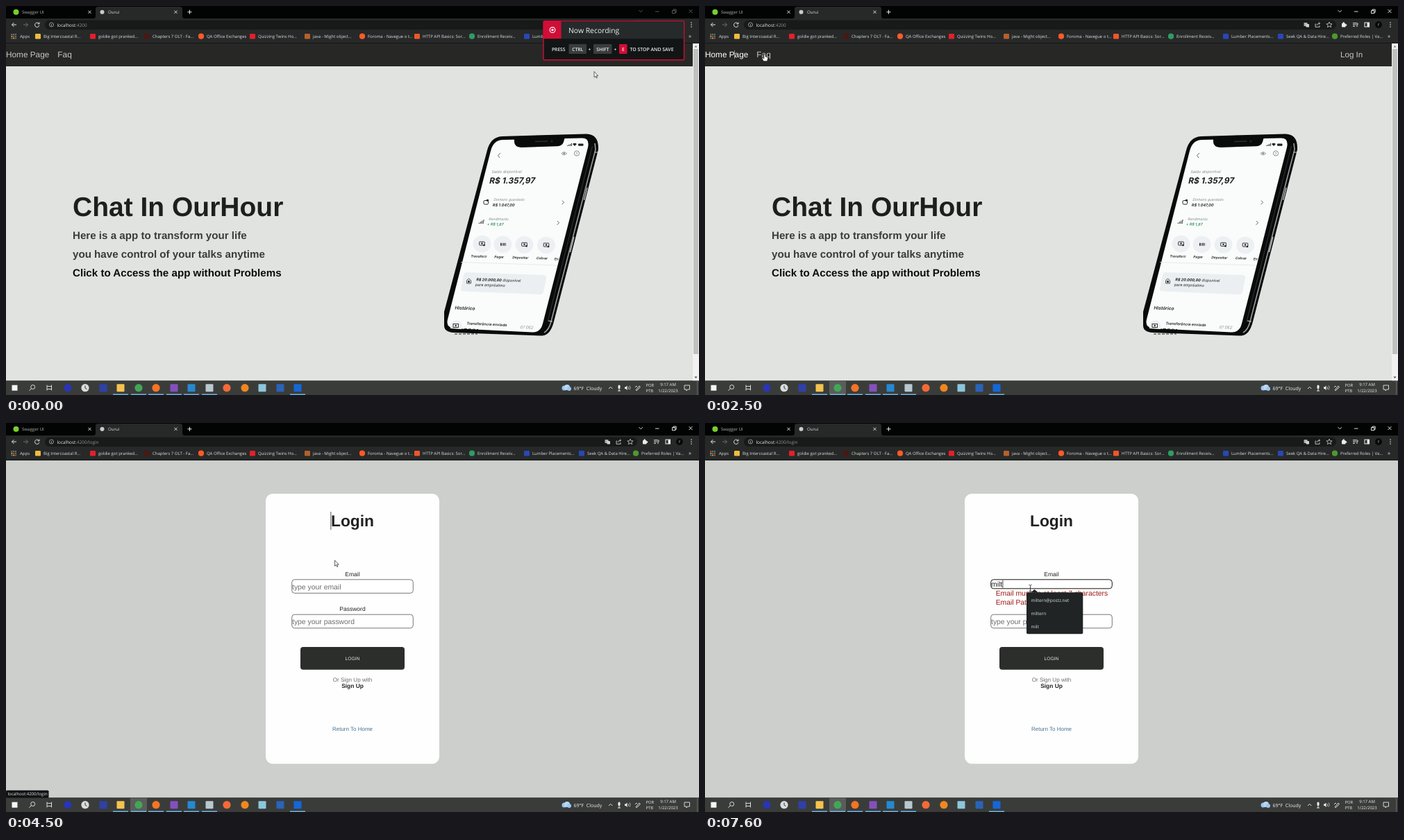
Recreate the animation shown at these times as an HTML page. Size 998 px wide and 561 px high, loop 8000 ms.

```html
<!DOCTYPE html>
<html lang="en">
<head>
<meta charset="utf-8">
<title>Login walkthrough</title>
<style>
html, body { margin: 0; height: 100%; overflow: hidden; background: #000; }
svg { display: block; width: 100%; height: 100%; }
text { text-rendering: geometricPrecision; white-space: pre; }
.ui { font-family: "Open Sans", "Noto Sans", sans-serif; }
.page { font-family: "Liberation Sans", Arial, sans-serif; }
.app { font-family: Inter, Roboto, sans-serif; }
.line { fill: none; stroke: #e4e6e6; stroke-width: 1; }
</style>
</head>
<body>
<svg id="stage" viewBox="0 0 998 561" xmlns="http://www.w3.org/2000/svg"></svg>
<script>
const rect = (x, y, w, h, fill, more = '') =>
  `<rect x="${x}" y="${y}" width="${w}" height="${h}" fill="${fill}" ${more}/>`;
const dot = (x, y, r, fill, more = '') => `<circle cx="${x}" cy="${y}" r="${r}" fill="${fill}" ${more}/>`;
const path = (d, fill, more = '') => `<path d="${d}" fill="${fill}" ${more}/>`;
const line = (d, more = '') => `<path d="${d}" class="line" ${more}/>`;
const text = (x, y, size, str, fill, more = '') =>
  `<text x="${x}" y="${y}" font-size="${size}" fill="${fill}" ${more}>${str}</text>`;
const group = (id, body, more = '') => `<g id="${id}" ${more}>${body}</g>`;
const bold = 'font-weight="700"', semi = 'font-weight="600"', mid = 'text-anchor="middle"';

// Browser frame
function browser() {
  const marks = [
    [42, '#f0bd3c', 0, 'Big Intercoastal R...'],
    [121, '#e3202b', 0, 'goldie got pranked...'],
    [199, '#4a1712', 0, 'Chapters 7 OLT - Fa...'],
    [277, '#ff5a26', 1, 'QA Office Exchanges'],
    [351, '#e3202b', 0, 'Quizzing Twins Ho...'],
    [430, '#b5602c', 0, 'java - Might object...'],
    [509, '#ff5a26', 1, 'Foroma - Navegue o t...'],
    [588, '#f0562b', 0, 'HTTP API Basics: Sor...'],
    [667, '#2f9c63', 1, 'Enrollment Receiv...'],
    [746, '#2748b8', 0, 'Lumber Placements...'],
    [825, '#2748b8', 0, 'Seek QA &amp; Data Hire...'],
    [903, '#4d9a2a', 1, 'Preferred Roles | Va...']
  ];
  let s = rect(0, 0, 998, 54, '#020303')
    + path('M126 18Q129 18 129 14V4Q129 1 133 1H250Q254 1 254 4V14Q254 18 257 18Z', '#272929')
    + rect(0, 18, 998, 35.5, '#272929')
    + rect(56, 20.5, 853, 13.5, '#181a1a', 'rx="6.7"')
    + dot(14.5, 8.7, 4, '#77d02b') + text(23, 11, 6.1, 'Swagger UI', '#aeb2b3')
    + dot(138.5, 8.7, 3, '#c8cccd') + text(147, 11, 6.1, 'Ourui', '#dfe2e2')
    + line('M118.5 6.7l4 4m0-4l-4 4M242.5 6.7l4 4m0-4l-4 4M261.5 8.7h6m-3-3v6')
    + line('M15 27H8.5m3-3l-3 3l3 3')
    + line('M25 27h6.5m-3-3l3 3l-3 3', 'style="stroke:#6b6f70"')
    + line('M47.3 25.3A3.2 3.2 0 1 0 47.9 28M48 23.5v2.4h-2.4')
    + dot(65.5, 27, 3, 'none', 'stroke="#b3b7b8" stroke-width=".8"') + rect(65.1, 26.2, .9, 2.5, '#b3b7b8')
    + text(73.5, 29.5, 6.4, 'localhost<tspan fill="#8f9495">:4200</tspan><tspan id="route" fill="#8f9495">/login</tspan>', '#e9ebeb')
    + rect(862.5, 24, 5, 5, '#aeb2b3', 'rx=".6"') + rect(865.5, 26, 4.5, 4.5, '#d0d3d3', 'rx=".6"')
    + line('M880 26h-1v4.3h6V28M881 28q.5-3 4.5-3m-1.7-1.6l1.8 1.6l-1.8 1.6', 'style="stroke-width:.8"')
    + path('M899 23l1.1 2.7 3 .2-2.3 1.9.8 2.9-2.6-1.6-2.6 1.6.8-2.9-2.3-1.9 3-.2z', 'none', 'stroke="#cfd2d2" stroke-width=".8"')
    + rect(917, 25, 5.5, 5.5, '#eceeee', 'rx=".8"') + dot(919.7, 24.6, 1.3, '#eceeee') + dot(923, 27.5, 1.3, '#eceeee')
    + line('M933 24.7h6.5M933 27h4.5M933 29.3h3M939 26v4m0-4h2')
    + rect(950, 24, 6.5, 6, 'none', 'stroke="#eee"') + rect(953.5, 24, 3, 6, '#eee')
    + dot(970, 27, 5, '#080909') + text(970, 29, 5.5, 'f', '#b9bcbc', mid)
    + [24, 27, 30].map(y => dot(987, y, .8, '#e6e8e8')).join('');
  for (let i = 0; i < 9; i++)
    s += rect(7.5 + i % 3 * 2.8, 40 + (i / 3 | 0) * 2.8, 1.8, 1.8, ['#e5533d', '#48a860', '#4a86e8', '#f0bd3c'][i % 4]);
  s += text(20, 46, 6, 'Apps', '#dfe2e2');
  for (const [x, color, round, name] of marks)
    s += (round ? dot(x + 4, 43.7, 4.1, color) : rect(x, 40, 8, 7.5, color, 'rx="1.2"'))
      + text(x + 12, 46, 6, name, '#dfe2e2');
  s += text(983, 46, 8, '»', '#dfe2e2');
  return s + group('buttons',
    path('M911.5 6l2.7 2.7l2.7-2.7M935 8h5.5M959.5 6.5h4.2v4.2h-4.2zM961 6.5V5h4.2v4.2h-1.5M983.5 5l5 5m0-5l-5 5', 'none'),
    'stroke-width=".9"');
}

// Text lying on the tilted phone screen
const tilt = (x, y, size, str, fill = '#1b1d1e', more = '') =>
  `<g transform="translate(${x} ${y}) rotate(${((y - 270) / 80).toFixed(2)}) skewX(-12)">${text(0, 0, size, str, fill, more)}</g>`;

function phone() {
  const gray = '#85898c';
  let s = path('M714 188L836 184.5Q854 185 853 207L789 455Q784 475 772 475.5L645 471Q631 470 631 461V441L693 208Q698 189 714 188Z', '#090a0a')
    + line('M848 198L849 207L785 455Q782 467 775 471', 'style="stroke:#999d9f;stroke-width:1.6"')
    + line('M844.5 202L780 455', 'style="stroke:#2b2e30;stroke-width:1.2"')
    + line('M837 262l-4.5 18M818 333l-5.500 22M848 211h4M781 454l6 1', 'style="stroke:#cdd0d0;stroke-width:1.2"')
    + path('M716 193L829 190.5Q841 190 838 204L773 458Q770 471 758 470.5L646 465Q633 464 636 452L698 209Q702 193 716 193Z', '#fafcfb')
    + path('M732 191L805 189L803 196Q801 202 794 202.3L742 204Q732 203 732 196Z', '#090a0a')
    + line('M762 195.5l18-.5', 'style="stroke:#2c2f31;stroke-width:1.5"') + dot(786, 195, 1.6, '#242a33')
    + path('M808 202v-1h1v1zm2 0v-2h1v2zm2 0v-3h1v3zm2 0v-4h1v4z', '#222')
    + path('M816 199q3-2.5 6 0l-3 3z', '#222') + rect(824, 198.5, 7.5, 3.3, '#222', 'rx="1"')
    + line('M712 212l-3.5 3.5l2.5 3.5M801 280.5l2.5 2.7l-3 3M794 310l2.5 2.7l-3 3', 'style="stroke:#55595b;stroke-width:.9"')
    + line('M764.5 399.5l2.5 2.7l-3 3', 'style="stroke:#222"')
    + line('M800 212.7q3.5-4 7.5 0q-4 4-7.5 0z', 'style="stroke:#6d7173;stroke-width:.8"') + dot(803.7, 212.6, 1.2, '#6d7173')
    + dot(822, 212.5, 3.6, 'none', 'stroke="#6d7173" stroke-width=".8"') + text(822, 214.7, 5.5, '?', '#6d7173', mid)
    + tilt(699, 241, 5.6, 'Saldo disponível', gray)
    + tilt(695.5, 256, 11.9, 'R$ 1.357,97', '#1b1d1e', bold)
    + rect(688, 280.5, 6.5, 5.5, 'none', 'stroke="#222" rx="1.5"') + rect(692, 279, 3, 2.5, '#222')
    + tilt(702, 281, 5.1, 'Dinheiro guardado', gray)
    + tilt(700.5, 289, 5.6, 'R$ 1.047,00', '#1b1d1e', semi)
    + path('M680.5 314l.3-1.5h1.2l-.3 1.5zm2 0l.5-3h1.2l-.5 3zm2 0l.7-4.5h1.2l-.7 4.5zm2 0l1-6h1.2l-1 6z', '#55595b')
    + tilt(695, 309, 5.1, 'Rendimento', gray)
    + tilt(692.5, 316.5, 5.4, '+ R$ 1,87', '#2f8c58', semi);
  [[685.5, 343, 669, 'Transferir'], [715.5, 343.7, 703, 'Pagar'], [746.5, 344.3, 729, 'Depositar'], [778, 345, 763.5, 'Cobrar']]
    .forEach(([x, y, tx, name], i) => {
      s += `<ellipse cx="${x}" cy="${y}" rx="13" ry="12.3" fill="#edf0f3"/>`
        + (i === 1
          ? path(`M${x - 3.5} ${y - 2}h1.5v4h-1.5zm2.5 0h.8v4h-.8zm2 0h1.5v4h-1.5zm2.5 0h.8v4h-.8z`, '#222')
          : rect(x - 3.8, y - 3, 7.6, 5, 'none', 'stroke="#222" stroke-width=".9" rx=".6"') + dot(x, y - .5, 1.2, '#222') + dot(x + 3, y + 2, 1.3, '#222'))
        + tilt(tx, 362.5 + i * .9, 4.9, name, '#1b1d1e', semi);
    });
  return s + tilt(789.5, 366.5, 4.9, 'En', '#1b1d1e', semi)
    + line('M655 369.5L794 374', 'style="stroke:#e1e4e6;stroke-width:.8"')
    + path('M664 384L774 388Q779 388.5 778 393L774 412Q773 416.5 768 416L659 411.5Q654 411 655 407L659 388Q660 384 664 384Z', '#ebeff2')
    + path('M663.5 400v-4q3-5 6 0v4z', 'none', 'stroke="#444" stroke-width=".9"') + rect(665, 396, 3, 3, '#444')
    + tilt(677, 396.3, 5.4, `<tspan ${bold}>R$ 20.000,00</tspan> disponível`)
    + tilt(675.5, 403.8, 5.4, 'para empréstimo')
    + tilt(646, 437.5, 6.7, 'Histórico', '#1b1d1e', semi)
    + path('M640 465Q639 454 649 453.5Q658 454 656 466Z', '#edf0f3')
    + rect(644, 458.5, 7.5, 5, 'none', 'stroke="#222" stroke-width=".9"') + dot(647.7, 461, 1.2, '#222')
    + tilt(663, 459.5, 5.4, 'Transferência enviada', '#1b1d1e', semi)
    + tilt(740, 465, 5.6, '07 DEZ', gray)
    + line('M660 465.5l20 1M646 473h33', 'style="stroke:#222;stroke-dasharray:4 2"');
}

function home() {
  return rect(0, 53.5, 998, 487, '#e1e3e0') + rect(0, 53.5, 989, 33.5, '#272826')
    + text(0, 74.3, 11.8, 'Home Page', '#c4c6c4', 'id="homeLink"')
    + text(74.3, 74.3, 11.9, 'Faq', '#c4c6c4')
    + text(915, 74.3, 11.6, 'Log In', '#c4c6c4', 'id="loginLink"')
    + rect(42, 64, .8, 12, '#aaa', 'id="navCaret"')
    + text(96, 303.3, 39, 'Chat In OurHour', '#1d1f1d', bold)
    + text(96, 335.5, 15.15, 'Here is a app to transform your life', '#3a3c3a', bold)
    + text(96, 363, 15.15, 'you have control of your talks anytime', '#3a3c3a', bold)
    + text(96, 390, 15.15, 'Click to Access the app without Problems', '#0c0d0c', bold)
    + `<g class="app">${phone()}</g>`
    + rect(989, 53.5, 9, 487, '#f0f1f0') + rect(990, 62, 7, 440, '#bfc1bf')
    + path('M991.5 59.5l2-2.5l2 2.5z', '#777') + path('M991.5 534.5l2 2.5l2-2.5z', '#444');
}

function login() {
  const red = '#a01818', ink = '#202220';
  return rect(0, 53.5, 998, 487, '#cccfcc') + rect(374, 102, 250, 389.5, '#fdfefd', 'rx="10"')
    + text(499, 148.5, 22.8, 'Login', ink, `${bold} ${mid}`)
    + rect(467.4, 128, .9, 26, '#444', 'id="titleCaret"')
    + text(499, 220.7, 8.5, 'Email', ink, mid)
    + rect(411.7, 225.8, 174.6, 19.6, '#fff', 'id="field" rx="4"')
    + text(412, 239.7, 10.4, 'type your email', '#6c6e6c', 'id="hint"')
    + text(412, 235.8, 10.4, '', ink, 'id="typed"')
    + rect(412.4, 228, .8, 14, '#111', 'id="caret"')
    + text(499, 271, 8.5, 'Password', ink, mid)
    + rect(411.7, 276.2, 174.6, 19.6, '#fff', 'rx="4" stroke="#767876"')
    + text(412, 290, 10.4, 'type your password', '#6c6e6c')
    + group('errors', text(418.7, 249, 10.35, 'Email must be at least 7 characters', red)
      + text(418.7, 261.5, 10.35, 'Email Pattern Invalid', red))
    + rect(424, 323, 150, 32.7, '#2c2e2c', 'rx="4"')
    + text(499, 342, 6.7, 'LOGIN', '#e3e5e3', mid)
    + text(499, 372.5, 8.1, 'Or Sign Up with', '#6c6e6c', mid)
    + text(499, 382.3, 8.4, 'Sign Up', ink, `${bold} ${mid}`)
    + text(499, 443.7, 8, 'Return To Home', '#4b7196', mid)
    + group('popup', rect(463, 244.3, 81.3, 60, '#202425', 'rx="2"') + path('M469 244.5l5.5-4.5l5.5 4.5z', '#202425')
      + ['miltern@postz.net', 'miltern', 'milt'].map((s, i) => text(469.5, 258 + i * 18.8, 6.4, s, '#dfe2e2')).join(''), 'class="ui"');
}

function taskbar() {
  const icons = [
    [89, '#2a35b5', 1], [114, '#d9dcdc', 1], [140, '#3040a8', 0], [165, '#f3c34e', 0], [191, '#43a556', 1],
    [216, '#f57425', 1], [242, '#8450bd', 0], [267, '#2589d0', 0], [293, '#b9c8d0', 0], [318, '#f56a37', 1],
    [344, '#f0871f', 1], [369, '#8cc6dc', 0], [395, '#2a63b8', 0], [420, '#1567d6', 0]
  ];
  let s = rect(0, 540.5, 998, 20.5, '#3a3c3a') + rect(179, 540.5, 24, 20.5, '#5a5c5a', 'id="active"')
    + rect(8.5, 546.7, 8, 8, '#f4f6f6')
    + dot(38.7, 549.5, 3, 'none', 'stroke="#eee" stroke-width=".9"') + line('M36.5 551.7l-3 3')
    + line('M59 546.5v8m6.5-8v8M59 548.5h6.5v4H59', 'style="stroke-width:.9"');
  for (const [x, color, round] of icons) {
    s += round ? dot(x, 550.7, 5.6, color) : rect(x - 5.5, 545.3, 11, 11, color, 'rx="1"');
    if ([165, 191, 216, 242, 267, 293, 420].includes(x)) s += rect(x - 11, 559.5, 22, 1.5, '#6fb3e4');
  }
  return s + line('M114 547.5v3.5l2.5 1.5', 'style="stroke:#333"')
    + dot(804, 551, 3.5, '#9cc6ee') + dot(808, 550, 4, '#b9d8f4') + dot(811, 552, 3, '#9cc6ee')
    + text(817.5, 553.6, 7, '69°F  Cloudy', '#eef0f0')
    + line('M868 552l2.7-2.7l2.7 2.7') + rect(881.5, 546.5, 3, 5.5, '#eee', 'rx="1.5"') + line('M883 552v3m-2 0h4')
    + path('M891 549.5h1.5l2-2v6.5l-2-2H891z', '#eee') + line('M896 549q1.5 2 0 4M898 547.5q2.5 3 0 6', 'style="stroke-width:.7"')
    + line('M907 554l5-6l1.5 1.5l-5 5zM906 550q2-3 3-1')
    + text(921.5, 548.6, 5.8, 'POR', '#eef0f0') + text(921.5, 557.4, 5.8, 'PTB', '#eef0f0')
    + text(953.5, 548.4, 6, '9:17 AM', '#eef0f0', mid) + text(953.5, 557.4, 6, '1/22/2023', '#eef0f0', mid)
    + line('M977 547h7.5v6h-3l-1.5 2v-2h-3z', 'style="stroke-width:.9"')
    + rect(995, 541, .7, 20, '#777');
}

function recorder() {
  const red = '#d20d36';
  const key = (x, w, s, fill = '#3a3d3e') => rect(x, 55, w, 14, fill, 'rx="1"') + text(x + w / 2, 64.6, 6.7, s, '#f0f1f1', `${semi} ${mid}`);
  return rect(774, 21.7, 202.5, 56, '#121516', `rx="1.5" stroke="${red}" stroke-width="1.4"`)
    + rect(799, 22.4, 177, 24.8, '#262a2b') + rect(774, 22, 25.5, 25.2, red)
    + dot(787, 34.5, 3.9, 'none', 'stroke="#fff" stroke-width="1.1"') + dot(787, 34.5, 1.7, '#fff')
    + text(810, 38.6, 10.4, 'Now Recording', '#f0f1f1')
    + text(786, 64.6, 6.7, 'PRESS', '#f0f1f1', semi) + key(810.5, 25.5, 'CTRL') + text(838.5, 64.6, 6.7, '+', '#eee', semi)
    + key(846, 26.5, 'SHIFT') + text(875.5, 64.6, 6.7, '+', '#eee', semi) + key(883, 11.5, 'E', red)
    + text(898.5, 64.6, 6.9, 'TO STOP AND SAVE', '#f0f1f1', semi);
}

const pointers = group('pointer',
  group('arrow', path('M0 0V8.3L1.9 6.6L3.2 9.5L4.5 8.9L3.2 6.1H5.7Z', '#fff', 'stroke="#222" stroke-width=".7"'))
  + group('hand', path('M-1 1Q0-.5 1 1V4Q4.5 4 4.5 6.5L3.5 10.5H-1.5L-4 6.5Q-3.5 5-1 6.8Z', '#fff', 'stroke="#222" stroke-width=".6"'))
  + group('beam', path('M-2-4.5Q0-4.5 0-3.5Q0-4.5 2-4.5M0-3.5V3.5M-2 4.5Q0 4.5 0 3.5Q0 4.5 2 4.5', 'none', 'stroke="#333" stroke-width=".9"')));

document.getElementById('stage').innerHTML =
  group('home', home(), 'class="page"') + group('login', login(), 'class="page"')
  + `<g class="ui">${browser()}${taskbar()}`
  + group('status', rect(0, 529.7, 61.5, 11, '#101313', 'rx="1.5"') + text(2.5, 537.3, 6.1, 'localhost:4200/login', '#dfe2e2'))
  + group('recorder', recorder()) + '</g>' + pointers;

// Time, x, y of the pointer's hot spot
const route = [
  [0, 847, 94.5], [300, 700, 112], [900, 66, 104], [1100, 34, 119], [1500, 24, 98], [1800, 42, 69], [1900, 42, 69],
  [2400, 86, 69], [2900, 86, 69], [3700, 927, 67], [3900, 929, 69], [4200, 929, 69], [4300, 850, 110],
  [4400, 736, 149], [4500, 473.5, 198], [4700, 463, 218], [5000, 466, 234], [5200, 468.5, 238]
];
function pointerAt(t) {
  const i = route.findIndex(k => k[0] > t);
  if (i < 0) return route[route.length - 1].slice(1);
  const [a, b] = [route[i - 1], route[i]], k = (t - a[0]) / (b[0] - a[0]);
  return [a[1] + (b[1] - a[1]) * k, a[2] + (b[2] - a[2]) * k];
}

const $ = id => document.getElementById(id);
const show = (id, on) => $(id).setAttribute('visibility', on ? 'inherit' : 'hidden');
const set = (id, attrs) => { for (const k in attrs) $(id).setAttribute(k, attrs[k]); };

function draw(now) {
  const t = Math.floor(now % 8000 / 100) * 100;
  const between = (a, b) => t >= a && t < b;
  const loginPage = t >= 4500, typing = t >= 6700, focused = t >= 5500;
  const [x, y] = pointerAt(t);

  $('home').style.display = loginPage ? 'none' : '';
  $('login').style.display = loginPage ? '' : 'none';
  show('recorder', t < 1000);
  show('active', t >= 1900);
  set('buttons', { stroke: t < 1900 ? '#5c6061' : '#f0f2f2' });
  show('route', t >= 4200);
  show('status', between(4200, 5100));
  set('homeLink', { fill: between(1700, 4200) ? '#fff' : '#c4c6c4' });
  set('loginLink', { fill: between(3700, 4500) ? '#fff' : '#c4c6c4' });
  show('navCaret', between(1900, 2900));

  show('titleCaret', !focused);
  set('field', { height: typing ? 13 : 19.6, stroke: focused ? '#151715' : '#767876' });
  show('hint', !typing);
  show('errors', typing);
  show('popup', t >= 6800);
  $('typed').textContent = typing ? 'milt'.slice(0, 1 + Math.floor((t - 6700) / 130)) : '';
  show('caret', between(5500, 6100) || typing);
  set('caret', {
    x: 412.3 + (typing && $('typed').getComputedTextLength()),
    y: typing ? 226.7 : 229, height: typing ? 11 : 13
  });

  const overLink = !loginPage && y > 62 && y < 80 && (x < 62 || x > 74 && x < 95 || x > 915 && x < 947);
  const shape = overLink ? 'hand' : t >= 5100 ? 'beam' : 'arrow';
  for (const id of ['arrow', 'hand', 'beam']) show(id, id === shape);
  set('pointer', { transform: `translate(${x} ${y})` });
}

const start = performance.now();
(function tick() {
  draw(performance.now() - start);
  requestAnimationFrame(tick);
})();
</script>
</body>
</html>
```
